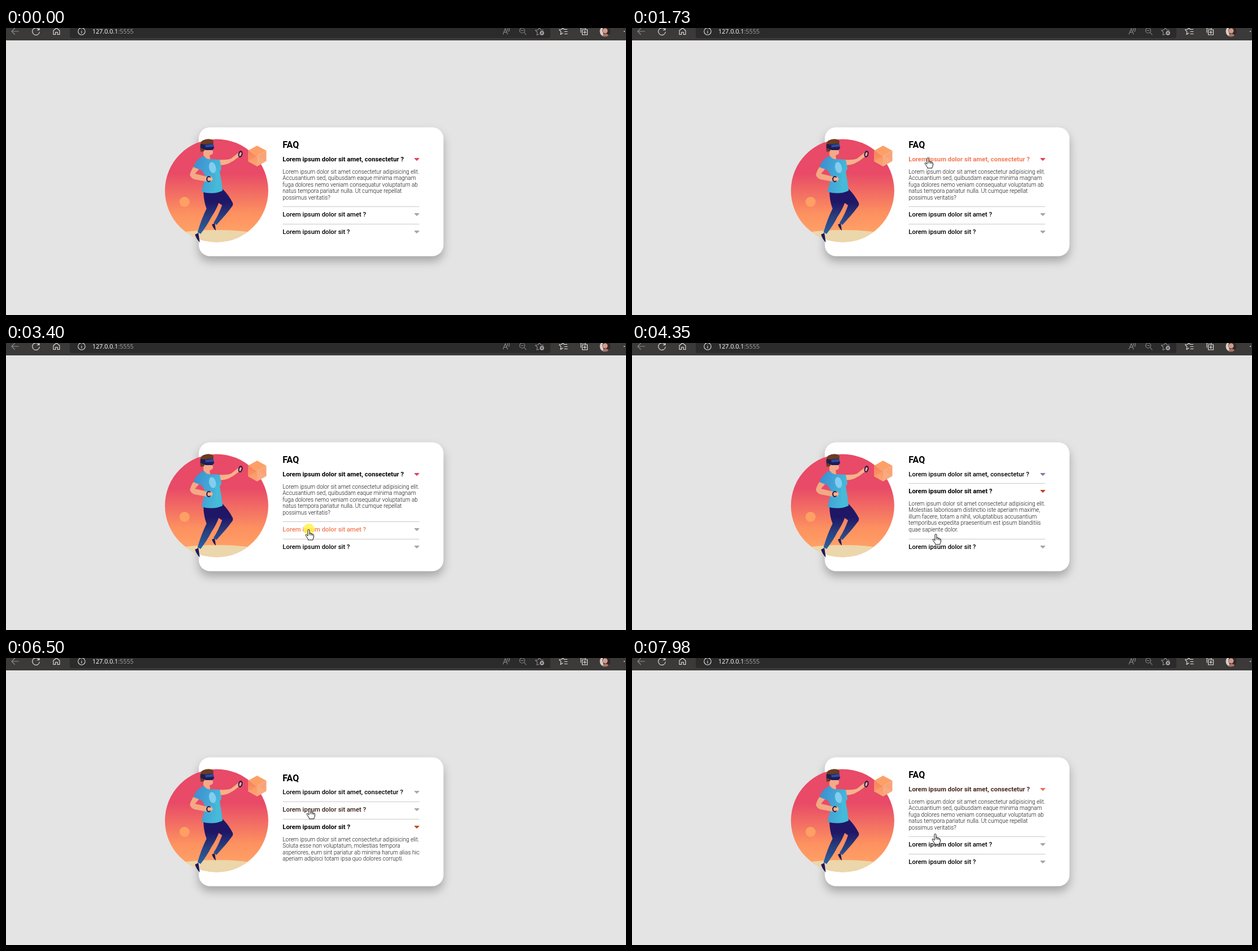
An HTML page for the animation above (8000 ms loop, 1099 by 510 pixels).

```html
<!DOCTYPE html>
<html lang="en">
<head>
<meta charset="utf-8">
<title>FAQ accordion</title>
<style>
  html, body { margin: 0; width: 100%; height: 100%; overflow: hidden; background: #e4e4e4; }
  svg { display: block; width: 1099px; height: 510px; }
  text { font-family: Roboto, sans-serif; white-space: pre; }
  .title { font-size: 16px; font-weight: 700; }
  .question { font-size: 11.33px; }
  .answer { font-size: 10px; font-weight: 300; fill: #111; }
  .url { font: 500 10.8px "Open Sans", sans-serif; fill: #fff; }
  .port { font-weight: 400; fill: #a3a3a3; }
  .icon { fill: none; stroke: #e6e6e6; stroke-width: 1.1; stroke-linecap: round; stroke-linejoin: round; }
  .dim { stroke: #8d8d8d; }
  .card { filter: drop-shadow(0 9px 8px rgba(0, 0, 0, .27)); }
</style>
</head>
<body>
<svg viewBox="0 0 1099 510">
  <defs>
    <linearGradient id="sky" x2="0" y2="1">
      <stop offset=".33" stop-color="#e84a67"/><stop offset=".6" stop-color="#f67b62"/>
      <stop offset=".72" stop-color="#fd9160"/><stop offset=".9" stop-color="#ffa066"/>
    </linearGradient>
    <linearGradient id="shirt" x2="1" y2=".3">
      <stop offset=".1" stop-color="#3d8fd0"/><stop offset=".9" stop-color="#46b6d9"/>
    </linearGradient>
    <linearGradient id="pants" gradientUnits="userSpaceOnUse" x1="0" y1="300" x2="0" y2="366">
      <stop offset=".15" stop-color="#1f1766"/><stop offset=".55" stop-color="#29407f"/><stop offset="1" stop-color="#2c62a4"/>
    </linearGradient>
    <linearGradient id="face" x2="0" y2="1">
      <stop stop-color="#f6825e"/><stop offset="1" stop-color="#fd9e64"/>
    </linearGradient>
    <clipPath id="disc"><circle cx="373.3" cy="289" r="91.6"/></clipPath>
    <clipPath id="portrait"><circle cx="1062" cy="6" r="9.5"/></clipPath>
  </defs>

  <!-- browser bar -->
  <path fill="#3b3a39" d="M0 0h1099v22H0z"/>
  <path fill="#2b2b2b" d="M113 0h852v14q0 4-4 4H117q-4 0-4-4z"/>
  <g class="icon">
    <path class="dim" d="M22.5 6H10m5.500-5.500L10 6l5.500 5.500"/>
    <path d="M58.5 3A6.300 6.300 0 1 0 59.300 7M59 0v3.500h-3.700"/>
    <path d="M84 4.500L89.500 0 95 4.500V11.500h-3.700V7.500h-3.600v4H84z"/>
    <circle cx="134" cy="6" r="6.200"/><path d="M134 5.500v3.500M134 3v.1"/>
    <g class="dim">
      <path d="M881 11l4-10 4 10m-6.700-3.500h5.400M888.500 1q1.500 1.500 0 4M891-.5q2.600 3 0 7"/>
      <circle cx="915" cy="4.500" r="4.500"/><path d="M918.500 8l3.500 4M913 4.500h4"/>
      <path d="M945 11l-4 1.500.8-5-3.500-3.500 5-.7L945.500-1l2.300 4.300 5 .7"/>
    </g>
    <path d="M987 9l-4 2.500.8-4.800L980.500 3l4.700-.5L987-1l2 3.500h5.500M990 6.500h5M990 10.500h5"/>
    <path d="M1019 8V0h8v2M1021.500 3h9v9h-9zM1026 5v5M1023.500 7.500h5"/>
  </g>
  <circle cx="950" cy="9" r="3.700" fill="#b5a9b5"/>
  <path d="M950 7v4M948 9h4" stroke="#2b2b2b"/>
  <g clip-path="url(#portrait)">
    <path fill="#352726" d="M1052-4h20v20h-20z"/>
    <path fill="#d8cdc8" d="M1052-4h7l-2 9 4 11h-9z"/>
    <circle cx="1062" cy="5" r="4.500" fill="#cf9c8c"/>
    <path fill="#a8746a" d="M1056 17q2-7 7-7t7 7z"/>
  </g>
  <circle cx="1096" cy="6" r="1" fill="#e6e6e6"/>
  <text class="url" x="153" y="10">127.0.0.1<tspan class="port">:5555</tspan></text>

  <rect class="card" x="341.700" y="176.500" width="433.800" height="229" rx="20" fill="#fff"/>

  <!-- illustration -->
  <circle cx="373.3" cy="289" r="91.6" fill="url(#sky)"/>
  <ellipse cx="373" cy="378" rx="100" ry="19" fill="#ecd6ab" clip-path="url(#disc)"/>
  <circle cx="316.5" cy="309" r="9" fill="#fea064"/>
  <path fill="#fda067" d="M445 209l16.500 9L445 227.500 429 218z"/>
  <path fill="url(#face)" d="M429 218l16 9.500V246l-16-9z"/>
  <path fill="#f8a478" d="M461.500 218v18.500L445 246v-18.500z"/>
  <path fill="#ffc39a" opacity=".2" d="M429 237l16-10 16.500 9.500L445 246z"/>

  <path fill="url(#pants)" d="M364 290l20-4q11 11 18 25 1 4-2 7-6 8-11 14l-16 18-5-4q9-14 15-31l-19-13z"/>
  <path fill="url(#pants)" d="M350 289q0 18 5.500 32-9 18-16 42l5.500 3q12-16 19-30 10-15 14-28l4-20z"/>
  <path fill="#1f1a5c" d="M335 367l6-3 2.500 17q-6-6-8.500-14zM365 349l5-2 2 13q-5-4-7-11z"/>
  <path fill="#f7b28b" d="M377 234q15 1 22-2l14-11 6 1-1 5-7 3q-16 14-32 14z"/>
  <path fill="#f5a988" d="M350 207l15-2 2 17q-2 4-6 4l1 8-12-3z"/>
  <path fill="url(#shirt)" d="M351 227q4 7 11 6l17 1 3 16-3 5q3 17 5 34-16 8-38 2 5-13 6-30l-5-8-15-5q4-15 19-21z"/>
  <path fill="#45bedb" opacity=".65" d="M364 238l14 17q4 18 5 34l-13 4q6-27-6-55z"/>
  <ellipse cx="366" cy="248" rx="6" ry="10" fill="#83cdf0" transform="rotate(-12 366 248)"/>
  <path fill="#f3a985" d="M332 247l10 4-7 8 21 5 8 0 3 4-3 5-8 0-22-4q-7-3-8-8 1-6 6-14z"/>
  <path fill="#6b3c22" d="M345 220q-3-15 3-20 8-4 16-2 6 3 3 7l-12 3-4 11z"/>
  <path fill="#1e1c58" d="M345 206l8 1 14-2 2 8-3 4h-12l-9-4z"/>
  <path fill="#2c4ca0" d="M353 208l14-2 1 5-14 1z"/>
  <g fill="none" stroke="#24184c" stroke-width="2">
    <ellipse cx="415.5" cy="224" rx="2.800" ry="5" transform="rotate(15 415.5 224)"/>
    <ellipse cx="359.5" cy="268.5" rx="3.500" ry="4.500"/>
  </g>
  <ellipse cx="362" cy="268.5" rx="3.500" ry="3" fill="#f7b28b"/>

  <text class="title" id="title" x="490.3">FAQ</text>
  <g id="list"></g>
  <circle id="click" r="10" fill="#fff23e" opacity=".8"/>
  <g id="cursor" fill="#fff" stroke="#111" stroke-linejoin="round">
    <path id="hand" d="M-2 2Q-2 .5-.5.500T1 2V7Q3.500 5.500 3.800 8 6 7 6.300 9 8.500 8.500 8.500 10.500V14Q8 16 7 17.500V19H-1.500V17.500L-5.500 11.500Q-6.500 9-4.500 9.300L-2 12ZM1 7v3.500M3.800 8v3M6.300 9v2.500"/>
    <path id="arrow" d="M0 0v16l3.700-3.500 2.500 5.700 2.600-1.100-2.500-5.600h5z"/>
  </g>
</svg>
<script>
const LOOP = 8000, ROW = 30.67, LINE = 11.6, ANSWER = 68;
const INTRO = 'Lorem ipsum dolor sit amet consectetur adipisicing elit.';
const INK = [0, 0, 0], HOVER = [243, 121, 84];

const items = [
  { question: 'Lorem ipsum dolor sit amet, consectetur ?',
    answer: [INTRO, 'Accusantium sed, quibusdam eaque minima magnam',
      'fuga dolores nemo veniam consequatur voluptatum ab',
      'natus tempora pariatur nulla. Ut cumque repellat', 'possimus veritatis?'],
    hover: [[1480, 0], [1710, 1], [2400, 1], [2640, 0], [6730, 0], [6960, 1], [7800, 1], [8010, .2]] },
  { question: 'Lorem ipsum dolor sit amet ?',
    answer: [INTRO, 'Molestias laboriosam distinctio iste aperiam maxime,',
      'illum facere, totam a nihil, voluptatibus accusantium',
      'temporibus expedita praesentium est ipsum blanditiis', 'quae sapiente dolor.'],
    hover: [[2750, 0], [3000, 1], [3610, 1], [3820, 0], [6460, 0], [6600, .7], [6780, 0]] },
  { question: 'Lorem ipsum dolor sit ?',
    answer: [INTRO, 'Soluta esse non voluptatum, molestias tempora',
      'asperiores, eum sint pariatur ab minima harum alias hic',
      'aperiam adipisci totam ipsa quo dolores corrupti.'],
    hover: [[4450, 0], [4680, 1], [5350, 1], [5630, 0]] }
];

// Which item is open from a given time on, and the three caret colours
const phases = [
  { at: 0, open: 0, carets: ['#e8415d', '#a6a6a6', '#a6a6a6'] },
  { at: 3610, open: 1, carets: ['#9272a2', '#bd4630', '#a6a6a6'] },
  { at: 5350, open: 2, carets: ['#a8a6b6', '#a8a6b6', '#bb5324'] },
  { at: 7320, open: 0, carets: ['#f0695c', '#a6a6a6', '#a6a6a6'] }
];
const clicks = [[3400, 3610], [5290, 5350], [7180, 7320]];
const pathX = [[780, 736], [1300, 541], [1520, 525], [2390, 525], [3080, 536], [3260, 537], [4300, 537],
  [4350, 539], [4690, 546], [6180, 546], [6500, 539], [6990, 535], [7790, 535], [7980, 538]];
const pathY = [[780, 455], [1300, 222], [1520, 230], [2390, 230], [3080, 326], [3180, 326], [3260, 331], [4300, 331],
  [4350, 339], [4690, 363], [6180, 363], [6500, 267], [6990, 239], [7790, 239], [7980, 312]];

const $ = id => document.getElementById(id);

function add(parent, tag, attrs, text = '') {
  const node = document.createElementNS('http://www.w3.org/2000/svg', tag);
  for (const key in attrs) node.setAttribute(key, attrs[key]);
  node.textContent = text;
  return parent.appendChild(node);
}

function valueAt(keys, t) {
  const next = keys.findIndex(key => key[0] > t);
  if (next < 0) return keys[keys.length - 1][1];
  if (next === 0) return keys[0][1];
  const [t0, a] = keys[next - 1], [t1, b] = keys[next];
  return a + (b - a) * (t - t0) / (t1 - t0);
}

const move = (node, x, y) => node.setAttribute('transform', `translate(${x} ${y})`);
const show = (node, on) => node.setAttribute('visibility', on ? 'visible' : 'hidden');

// Each item is drawn around the middle of its question line
items.forEach((item, i) => {
  item.group = add($('list'), 'g');
  if (i) add(item.group, 'rect', { x: 490.5, y: -14, width: 242, height: 1, fill: '#c9c9c9' });
  item.label = add(item.group, 'text', { class: 'question', x: 490.3, y: 4 }, item.question);
  item.caret = add(item.group, 'path', { d: 'M724.5-2h7.400q1.200.200.500 1.100l-3.400 3.300q-.800.700-1.600 0l-3.400-3.300q-.700-.900.500-1.100z' });
  item.body = add(item.group, 'g');
  item.answer.forEach((line, n) =>
    add(item.body, 'text', { class: 'answer', x: 490.3, y: Math.round(25.5 + n * LINE) }, line));
});

function draw(t) {
  const index = phases.filter(p => p.at <= t).length - 1;
  const { open, carets, at } = phases[index];
  // The closing question keeps its bold weight for a moment
  const closing = index && t < at + 120 ? phases[index - 1].open : -1;
  const top = items[open].answer.length < 5 ? 232.6 + LINE / 2 : 232.6;
  $('title').setAttribute('y', Math.round(top - 19.6));

  items.forEach((item, i) => {
    move(item.group, 0, Math.round(top + i * ROW + (i > open ? ANSWER : 0)));
    const k = valueAt(item.hover, t);
    item.label.style.fill = `rgb(${INK.map((c, n) => Math.round(c + (HOVER[n] - c) * k))})`;
    item.label.style.fontWeight = i === open || i === closing ? 700 : 500;
    item.caret.setAttribute('fill', carets[i]);
    show(item.body, i === open);
  });

  const x = valueAt(pathX, t), y = valueAt(pathY, t);
  const overList = x > 490 && x < 733 && y > 223 && y < 375;
  move($('cursor'), x, y);
  move($('click'), x, y);
  show($('hand'), t >= 780 && overList);
  show($('arrow'), t >= 780 && !overList);
  show($('click'), clicks.some(([from, to]) => t >= from && t < to));
}

function frame() {
  draw(performance.now() % LOOP);
  requestAnimationFrame(frame);
}
frame();
</script>
</body>
</html>
```
